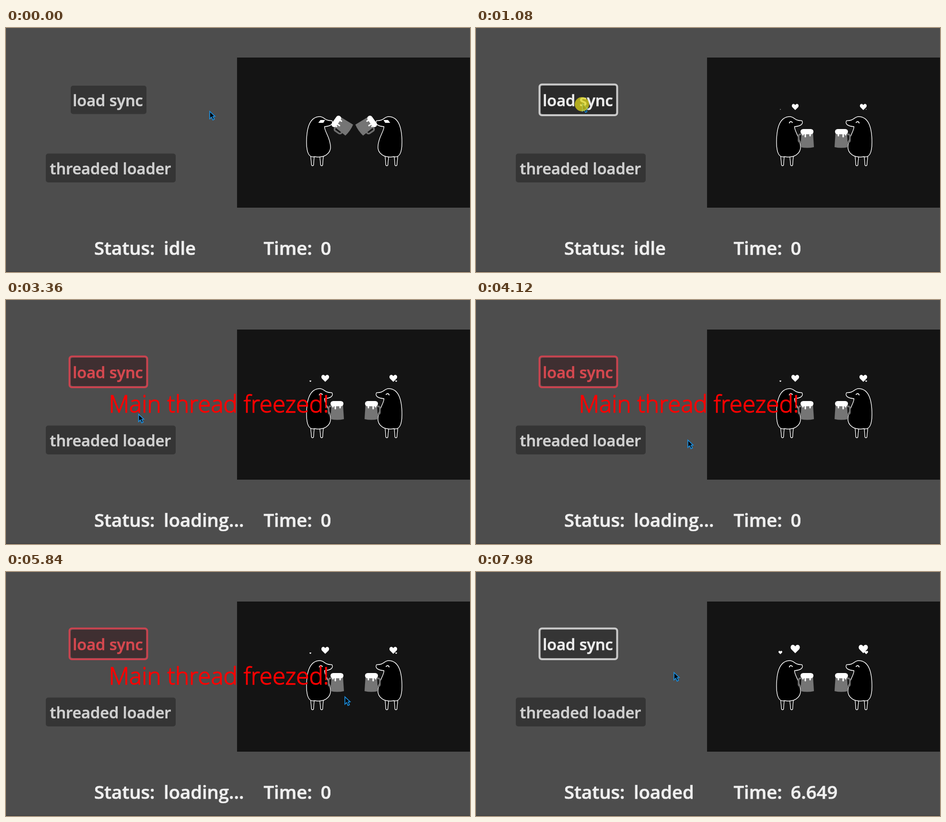
An HTML page for the animation above (8 s loop, 968 by 512 pixels).

```html
<!DOCTYPE html>
<html lang="en">
<head>
<meta charset="utf-8">
<title>Loading comparison</title>
<style>
html, body { margin: 0; width: 100%; height: 100%; overflow: hidden; background: #4d4d4d; }
svg { display: block; width: 968px; height: 512px; }
text { font-family: "Open Sans", "Noto Sans", sans-serif; font-weight: 600; white-space: pre; stroke-width: .7px; }
.button { font-size: 32.5px; fill: #d0d0d0; stroke: #d0d0d0; text-anchor: middle; }
.label { font-size: 38.2px; fill: #efefef; stroke: #efefef; }
#warning { font-size: 49.4px; font-weight: 300; fill: #f00; stroke: #f00; stroke-width: 1.3px; }
</style>
</head>
<body>
<svg viewBox="0 0 968 512">
  <defs>
    <path id="leg" d="M635 262 l2.500 26 q2 2 4 0 l2 -26"/>
    <g id="body" fill="#000" stroke="#fff" stroke-width="1.400" stroke-linejoin="round">
      <use href="#leg"/>
      <use href="#leg" x="19"/>
      <path d="M655 186 C664 186 664 195 680 194.500 Q685 205 664.500 207 C664 217 677 230 677 250 Q677 263 663 269 Q653 272 644 270 Q627 274 627 240 Q627 186 655 186Z"/>
    </g>
    <g id="mug">
      <rect x="-18" y="-11" width="12" height="17" rx="4" fill="none" stroke="#6e6e6e" stroke-width="3.500"/>
      <path d="M-12 -15 H12 L14 16 Q0 19 -14 16Z" fill="#757575"/>
      <rect x="-14" y="-22" width="27" height="11" rx="5.500" fill="#fff"/>
      <path d="M-9 -12 v2 M-4 -12 v6 M6 -12 v4" stroke="#fff" stroke-width="3" stroke-linecap="round"/>
    </g>
    <g id="drinker">
      <use href="#body"/>
      <path class="sip" d="M651.500 199 L656 193 H665.500 L662 199Z" fill="#fff"/>
      <path class="smile" d="M653.500 200 Q656 193 660.500 199" fill="none" stroke="#eee" stroke-width="2"/>
      <use class="mug" href="#mug"/>
    </g>
    <path id="heart" d="M0 .5 L-.44 .06 C-.7 -.3 -.25 -.7 0 -.27 C.25 -.7 .7 -.3 .44 .06Z" fill="#fff"/>
  </defs>

  <rect width="968" height="512" fill="#4d4d4d"/>
  <rect y="510" width="968" height="2" fill="#434343"/>
  <rect x="482" y="62" width="486" height="315" fill="#141414"/>

  <use href="#drinker"/>
  <use href="#drinker" transform="translate(1453 0) scale(-1 1)"/>
  <g id="hearts"></g>

  <rect id="syncBox" x="135" y="121" width="158" height="59.500" rx="5"/>
  <rect id="syncFrame" x="132.500" y="118.500" width="162" height="64.500" rx="5" fill="none" stroke-width="4"/>
  <text id="syncText" class="button" x="212.500" y="164">load sync</text>
  <rect x="83" y="263.500" width="271" height="60.500" rx="5" fill="#353535"/>
  <text class="button" x="218" y="307">threaded loader</text>

  <text class="label" x="184" y="476">Status:</text>
  <text id="status" class="label" x="329" y="476"></text>
  <text class="label" x="537.500" y="476">Time:</text>
  <text id="time" class="label" x="656.500" y="476"></text>

  <path id="cursor" d="M0 0 V15.500 L3.700 12 L6.500 18 L9.500 16.500 L6.800 10.700 L11 10.300Z" fill="#050505" stroke="#1b8fe0" stroke-width="1.700"/>
  <circle id="click" cx="221" cy="160" r="15" fill="#dfd71c" opacity=".75"/>
  <text id="warning" x="214.500" y="236">Main thread freezed!</text>
</svg>
<script>
const LOOP = 8000, PRESS = 980, FREEZE = 1200, LOADED = 7740, WARN = 3300;

// time, x, y of the pointer tip at its turning points
const pointer = [
  [0, 425, 175], [800, 222, 159], [1520, 222, 159], [2480, 511, 187],
  [3200, 262, 235], [4120, 442, 294], [5300, 430, 200], [5840, 707, 262],
  [6540, 441, 350], [7060, 336, 208], [7980, 413, 211]
];

const $ = id => document.getElementById(id);
const clamp = v => Math.min(1, Math.max(0, v));
const smooth = v => (v = clamp(v), v * v * (3 - 2 * v));
const mix = (a, b, u) => a + (b - a) * u;
const show = (el, on) => el.setAttribute('visibility', on ? 'visible' : 'hidden');
const paint = (el, attrs) => Object.entries(attrs).forEach(([k, v]) => el.setAttribute(k, v));

function addHeart(x, stateAt) {
  const el = document.createElementNS('http://www.w3.org/2000/svg', 'use');
  el.setAttribute('href', '#heart');
  $('hearts').append(el);
  return t => {
    const { y, size } = stateAt(t);
    paint(el, { transform: `translate(${x} ${y}) scale(${size})` });
  };
}

const bigHeart = t => ({ y: 178.5 - .012 * t, size: 18.5 * Math.sqrt(clamp((t - 680) / 740)) });
const smallHeart = t => ({ y: 177.5 - .006 * t, size: 7.5 * clamp((t - 1000) / 420) });
const hearts = [
  addHeart(666, bigHeart), addHeart(808, bigHeart),
  addHeart(635, smallHeart), addHeart(814, smallHeart)
];
const [sip, smile, mug] = ['.sip', '.smile', '.mug'].map(s => document.querySelector(s));

function pointerAt(t) {
  const next = pointer.findIndex(p => p[0] > t);
  if (next < 0) return pointer.at(-1).slice(1);
  const [t0, x0, y0] = pointer[next - 1], [t1, x1, y1] = pointer[next];
  const u = smooth((t - t0) / (t1 - t0));
  return [mix(x0, x1, u), mix(y0, y1, u)];
}

function drawScene(t) {
  const drink = 1 - smooth((t - 300) / 300);
  paint(mug, { transform: `translate(${mix(691, 703, drink)} ${mix(234, 205, drink)}) rotate(${-55 * drink})` });
  show(sip, drink > .5);
  show(smile, drink <= .5);
  hearts.forEach(drawHeart => drawHeart(t));
}

function drawButton(t) {
  const busy = t >= FREEZE && t < LOADED, focused = t >= PRESS;
  const held = focused && t < FREEZE;
  const ink = busy ? '#d5484f' : t > 480 ? '#ececec' : '#d0d0d0';
  paint($('syncBox'), { fill: busy ? '#3f2f31' : held ? '#2b2b2b' : '#353535' });
  paint($('syncFrame'), { stroke: busy ? '#c9434f' : '#cacaca' });
  Object.assign($('syncText').style, { fill: ink, stroke: ink });
  show($('syncFrame'), focused);
  show($('click'), held);
}

function draw(t) {
  // the scene stands still while the main thread is blocked
  drawScene(t < FREEZE ? t : FREEZE + Math.max(0, t - LOADED));
  drawButton(t);
  $('status').textContent = t < FREEZE ? 'idle' : t < LOADED ? 'loading...' : 'loaded';
  $('time').textContent = t < LOADED ? '0' : '6.649';
  show($('warning'), t >= WARN && t < LOADED);
  paint($('cursor'), { transform: `translate(${pointerAt(t).join(' ')})` });
}

const start = performance.now();
function tick() {
  draw((performance.now() - start) % LOOP);
  requestAnimationFrame(tick);
}
tick();
</script>
</body>
</html>
```
